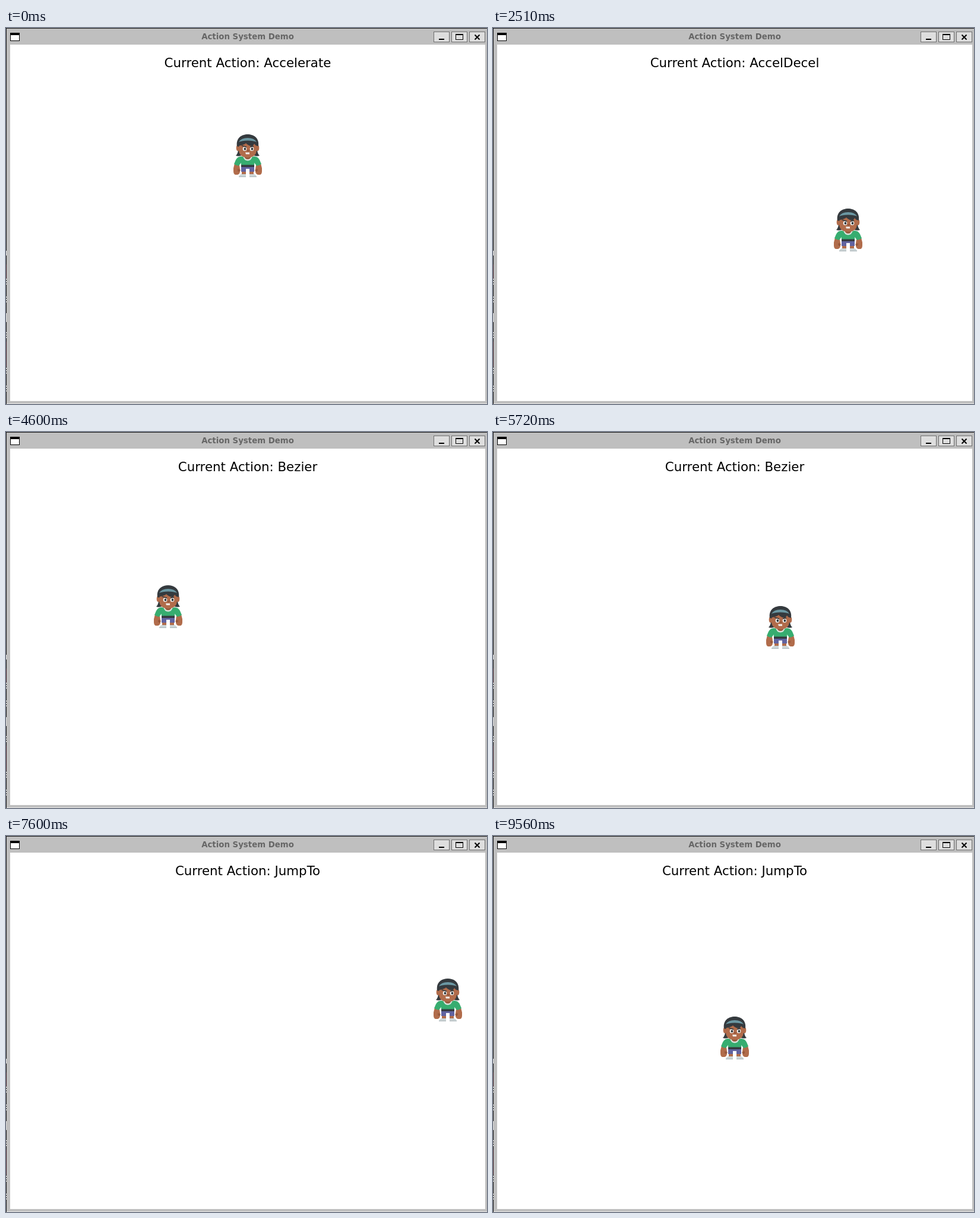
These frames come from a looping animation (810x633 px, 9.61 s). An HTML page:

```html
<!DOCTYPE html>
<html lang="en">
<head>
<meta charset="utf-8">
<title>Action System Demo</title>
<style>
  html, body { margin: 0; width: 100%; height: 100%; overflow: hidden; background: #bfbfbf; }
  svg { display: block; }
  text { font-family: "DejaVu Sans", sans-serif; text-anchor: middle; }
  .title { font-size: 13.333px; font-weight: bold; fill: #666; }
  .label { font-size: 21.333px; fill: #000; }
  .crisp { shape-rendering: crispEdges; }
  .skin { fill: #b16c4b; }
  .shade { fill: #985a3d; }
  .hair { fill: #353a3e; }
  .shirt { fill: #37ad70; }
  .shoe { fill: #ccd5d7; }
</style>
</head>
<body>
<svg width="810" height="633" viewBox="0 0 810 633">
  <defs>
    <g id="button" class="crisp">
      <rect width="27" height="18" fill="#6e6e6e"/>
      <rect x="1" y="1" width="25" height="16" fill="#dedede"/>
    </g>
    <g id="arm">
      <path class="skin" d="M2 49L10 52L11 58Q12 67 7 68H3Q0 67 0 62V57Z"/>
      <path class="shade" d="M7 58L12 60L10 63L7 62Z"/>
      <path class="shirt" d="M14 37Q7 37 4 43L1 50Q5 53 9 53L15 45Z"/>
    </g>
    <g id="leg">
      <rect class="skin" x="14" y="60" width="7" height="8"/>
      <path class="shoe" d="M9 72Q9 68 14 67H21V72Z"/>
      <path fill="#aab5b9" d="M9 71H21V72H9Z"/>
    </g>
    <g id="side">
      <path class="hair" d="M8 25Q8 32 4 36Q10 38 15 35L14 26Z"/>
      <ellipse class="skin" cx="7.5" cy="23" rx="2.8" ry="5"/>
    </g>
    <g id="eye">
      <ellipse cx="19" cy="24.5" rx="3.3" ry="3.5" fill="#f4f4f2"/>
      <ellipse cx="19.4" cy="24.6" rx="1.8" ry="2.2" fill="#30363a"/>
    </g>
  </defs>

  <!-- window frame -->
  <g class="crisp">
    <rect width="810" height="633" fill="#bfbfbf"/>
    <path fill="#181818" d="M0 0H810V1H0ZM0 0H1V633H0Z"/>
    <path fill="#3a1a24" d="M0 398H1V422H0ZM0 528H1V570H0Z"/>
    <path fill="#d8d8d8" d="M0 375H1V383H0ZM0 480H1V495H0Z"/>
    <path stroke="#d8d8d8" stroke-dasharray="2 2" d="M.5 422V434M.5 452V464M.5 512V524M.5 572V584M.5 602V614"/>
    <rect x="1" y="632" width="809" height="1" fill="#e6e6e6"/>
    <rect x="7" y="28" width="800" height="600" fill="#fff"/>
    <rect x="7" y="8" width="16" height="14"/>
    <rect x="8" y="12" width="14" height="9" fill="#fff"/>
  </g>
  <text class="title" x="407" y="19">Action System Demo</text>
  <use href="#button" x="720" y="6"/>
  <use href="#button" x="750" y="6"/>
  <use href="#button" x="780" y="6"/>
  <g class="crisp">
    <rect x="729" y="18" width="9" height="2"/>
    <path fill-rule="evenodd" d="M757 10H770V20H757ZM758 12V19H769V12Z"/>
  </g>
  <path d="M789.5 11.5L797.5 19.5M797.5 11.5L789.5 19.5" stroke="#000" stroke-width="2"/>

  <text class="label" id="label" x="407" y="66"></text>

  <g id="hero">
    <use href="#arm"/>
    <use href="#arm" transform="matrix(-1 0 0 1 48 0)"/>
    <use href="#leg"/>
    <use href="#leg" transform="matrix(-1 0 0 1 48 0)"/>
    <path fill="#6163a0" d="M13 54H35V63H27V58H21V63H13Z"/>
    <path class="shirt" d="M12 38Q24 35 36 38L35 53H13Z"/>
    <rect class="hair" x="13" y="51.5" width="22" height="3.5"/>
    <path fill="#d9e3dc" d="M16 37H32Q30 44.5 24 44.5Q18 44.5 16 37Z"/>
    <path class="shade" d="M18 36H30Q29 42 24 42Q19 42 18 36Z"/>
    <use href="#side"/>
    <use href="#side" transform="matrix(-1 0 0 1 48 0)"/>
    <path class="skin" d="M9 17Q24 8 39 17V27Q38 39 24 39Q10 39 9 27Z"/>
    <path class="hair" d="M6 20C4 6 14 0 24 0S44 6 42 20L38 19L35 16L32 20Q26 20 21 15Q17 18 10 19L9 21Z"/>
    <path fill="#6b98a3" d="M9 13Q13 6 24 6T39 13Q34 10.5 24 10.5T9 13Z"/>
    <use href="#eye"/>
    <use href="#eye" x="12"/>
    <path d="M14 19L22 21.5M34 20L28 21.5" stroke="#353a3e" stroke-width="1.7"/>
    <path class="shade" d="M23 26H27L26 29H23Z"/>
    <path fill="#f6f2ef" d="M20 30.5H27V33.5H21Z"/>
  </g>
</svg>
<script>
const LOOP = 9610, SECOND = 1062, GROUND = 340, RIGHT_LIMIT = 771;
const hero = document.getElementById("hero");
const label = document.getElementById("label");
const lerp = (a, b, t) => a + (b - a) * t;
const sigmoid = t => t < 1 ? 1 / (1 + Math.exp(6 - 12 * t)) : 1;

// Each action maps its progress 0..1 to the centre of the sprite.
const actions = [
  { name: "Accelerate", seconds: 2, at: t => [lerp(407, 607, t * t), lerp(215, GROUND, t * t)] },
  { name: "AccelDecel", seconds: 2, at: t => [lerp(607, 207, sigmoid(t)), GROUND] },
  { name: "Bezier", seconds: 3, at: t => [
      Math.min(207 + 600 * t, RIGHT_LIMIT),
      GROUND - 600 * t * (1 - t) * (1 - 2 * t)] },
  { name: "JumpTo", seconds: 2, at: t => [
      lerp(RIGHT_LIMIT, 407, t),
      GROUND - 100 * Math.abs(Math.sin(3 * Math.PI * t))] },
];

// The picture is held between ticks: 14 ticks from one mark to the next.
const marks = [80, 1050, 2030, 3000, 3970, 4950, 5930, 6900, 7870, 8850, 9844];
const ticks = [0];
for (let m = 0; m < marks.length - 1; m++)
  for (let i = 0; i < 14; i++)
    ticks.push(marks[m] + Math.floor((marks[m + 1] - marks[m]) * i / 140) * 10);

function draw(time) {
  let rest = ticks.findLast(tick => tick <= time);
  let action;
  for (action of actions) {
    if (rest < action.seconds * SECOND) break;
    if (action !== actions[actions.length - 1]) rest -= action.seconds * SECOND;
  }
  const [x, y] = action.at(Math.min(rest / (action.seconds * SECOND), 1));
  hero.setAttribute("transform", `translate(${Math.round(x) - 24} ${Math.round(y) - 36})`);
  const caption = "Current Action: " + action.name;
  if (label.textContent !== caption) label.textContent = caption;
}

const start = performance.now();
function loop() {
  draw((performance.now() - start) % LOOP);
  requestAnimationFrame(loop);
}
loop();
</script>
</body>
</html>
```
